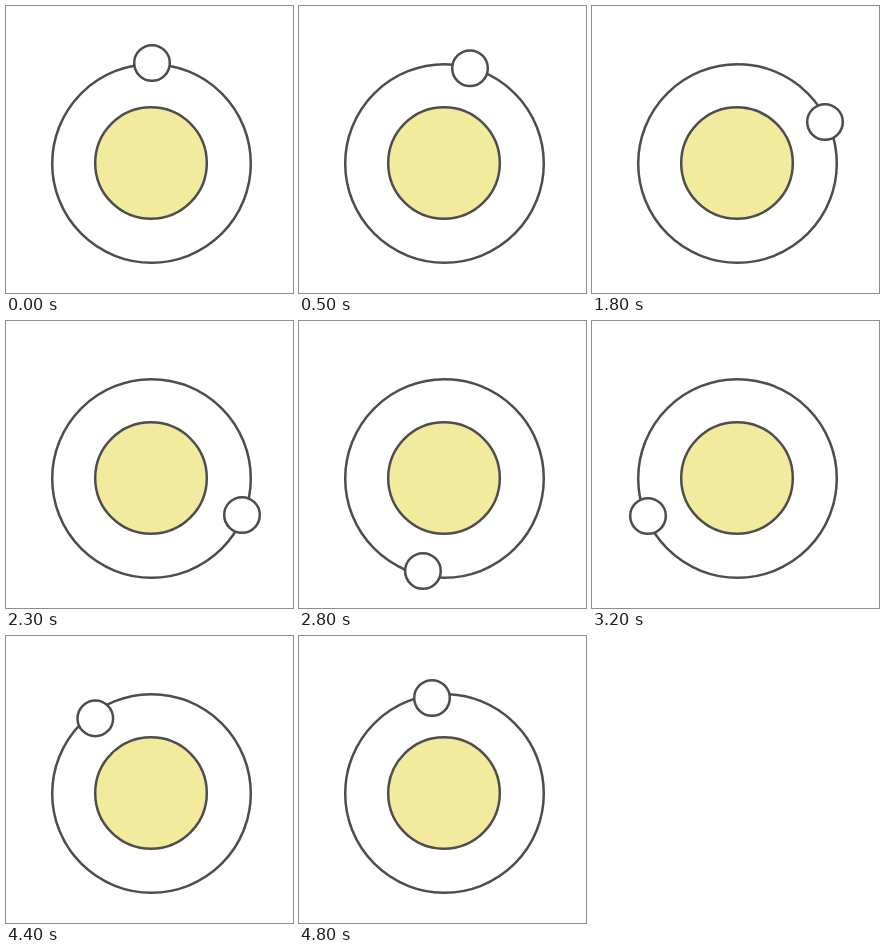
An HTML page that plays this animation: 287 by 287 pixels, repeating every 4.9 s.

```html
<!DOCTYPE html>
<html lang="en">
<head>
<meta charset="utf-8">
<title>Orbit</title>
<style>
  html, body { margin: 0; width: 100%; height: 100%; overflow: hidden; background: #fff; }
  svg { display: block; width: 287px; height: 287px; }
  circle { fill: #fff; stroke: #4d4d4f; stroke-width: 2.5; }
</style>
</head>
<body>
<svg viewBox="0 0 287 287">
  <circle cx="145.5" cy="157.5" r="99.3"/>
  <circle cx="145" cy="157" r="55.8" style="fill:#f2ea9d"/>
  <circle id="moon" r="17.8"/>
</svg>
<script>
const LOOP = 4900, STEP = 100, CX = 145.5, CY = 157.5;
const moon = document.getElementById('moon');

// Waypoints of the moon: time, x, y
const path = [
  [0, 146, 57], [600, 176, 64], [1000, 196, 73], [1200, 206, 78],
  [1800, 233, 116], [2100, 244, 157], [2300, 236, 194], [2400, 228, 214],
  [2700, 153, 252], [3000, 76, 225], [3200, 56, 195], [3600, 50, 158],
  [3900, 57, 129], [4200, 72, 98], [4800, 133, 62], [4900, 146, 57]
];
const times = path.map(p => p[0]);
const radii = path.map(([, x, y]) => Math.hypot(x - CX, y - CY));
const angles = [];
for (const [, x, y] of path) {
  let a = Math.atan2(x - CX, CY - y);
  while (angles.length && a < angles.at(-1)) a += 2 * Math.PI;
  angles.push(a);
}

const gap = i => times[i + 1] - times[i];
const slope = (v, i) => (v[i + 1] - v[i]) / gap(i);

function tangent(v, i) {
  if (i === 0) return slope(v, 0);
  if (i === v.length - 1) return slope(v, i - 1);
  const before = gap(i - 1), after = gap(i);
  return (slope(v, i - 1) * after + slope(v, i) * before) / (before + after);
}

// Cubic Hermite interpolation between waypoints
function sample(v, t) {
  let i = 0;
  while (t >= times[i + 1]) i++;
  const h = gap(i), u = (t - times[i]) / h, w = 1 - u;
  return v[i] * w * w * (1 + 2 * u) + v[i + 1] * u * u * (3 - 2 * u)
    + h * u * w * (tangent(v, i) * w - tangent(v, i + 1) * u);
}

function draw() {
  const t = Math.floor(performance.now() % LOOP / STEP) * STEP;
  const a = sample(angles, t), r = sample(radii, t);
  moon.setAttribute('cx', CX + r * Math.sin(a));
  moon.setAttribute('cy', CY - r * Math.cos(a));
  requestAnimationFrame(draw);
}
draw();
</script>
</body>
</html>
```
